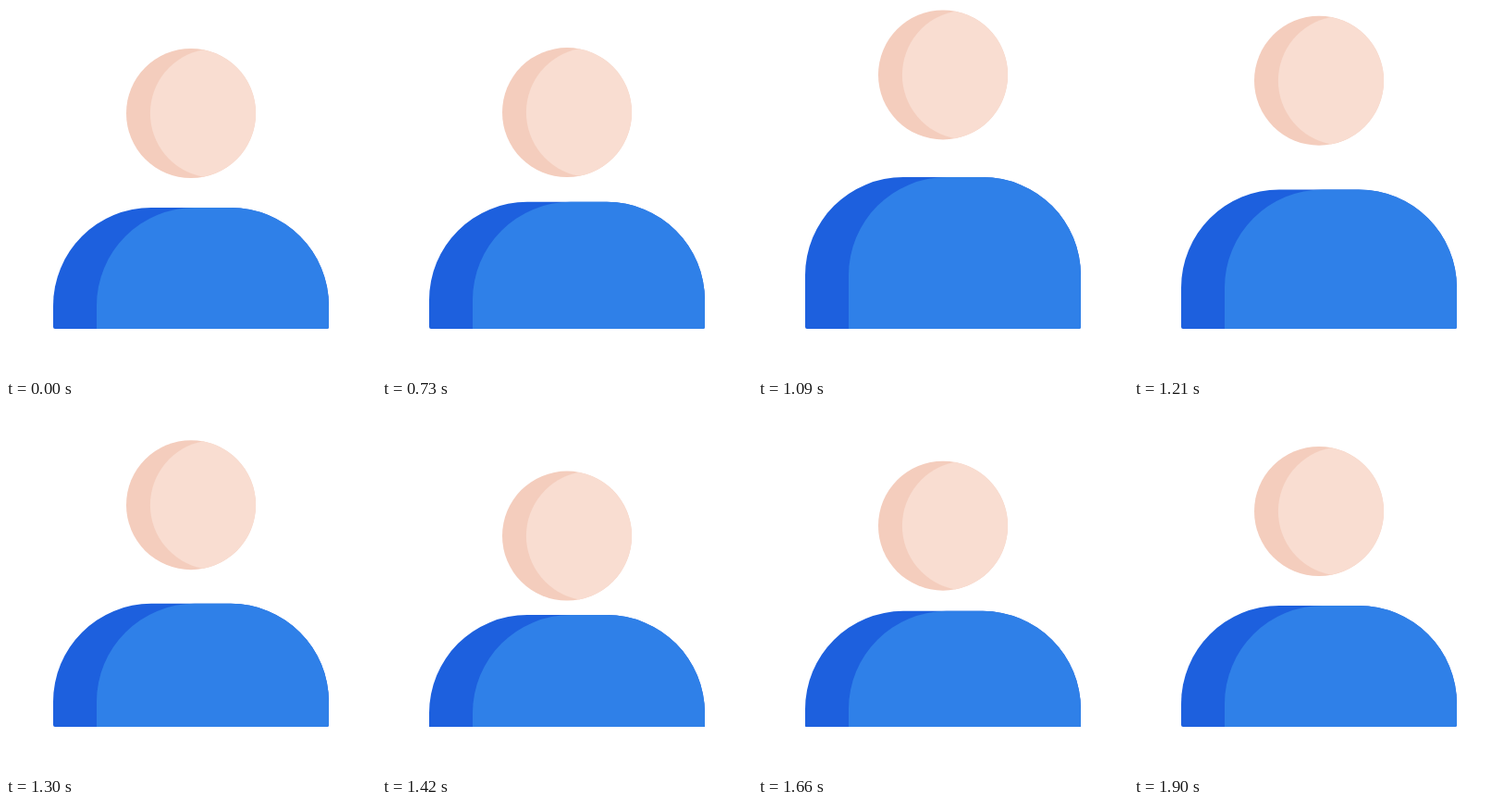
Write an HTML page that moves like this. It is 400 px wide and 400 px high and loops after 1.93 s.

```html
<!DOCTYPE html>
<html lang="en">
<head>
<meta charset="utf-8">
<title>Jumping person icon</title>
<style>
  html, body { margin: 0; width: 100%; height: 100%; overflow: hidden; background: #fff; }
  svg { display: block; width: 100vw; height: 100vh; }
</style>
</head>
<body>
<svg viewBox="0 0 400 400">
  <g id="head">
    <circle cx="200" cy="116" r="70" fill="#f4cdbd"/>
    <path d="M213 47.2 A70 70 0 0 1 213 184.8 A70 70 0 0 1 213 47.2 Z" fill="#f9ddd1" id="face"/>
  </g>
  <path id="bodyShade" fill="#1d60de"/>
  <path id="bodyLight" fill="#2f80e8"/>
</svg>
<script>
const LOOP = 1930, START = 700, STEP = 30;
const LEFT = 51, RIGHT = 349, BOTTOM = 349, TOP = 218, RADIUS = 106, SHADE = 47;
const byId = id => document.getElementById(id);
const mix = (a, b, p) => a + (b - a) * p;

const sineInOut = p => (1 - Math.cos(Math.PI * p)) / 2;
const sineOut = p => Math.sin(Math.PI * p / 2);
const cubicOut = p => 1 - (1 - p) ** 3;

// Cubic bezier easing with handles (x1, 0) and (x2, 1).
const bezier = (x1, x2) => p => {
  let lo = 0, hi = 1;
  for (let i = 0; i < 24; i++) {
    const t = (lo + hi) / 2, u = 1 - t;
    if (3 * u * u * t * x1 + 3 * u * t * t * x2 + t ** 3 < p) lo = t; else hi = t;
  }
  return 3 * (1 - lo) * lo * lo + lo ** 3;
};

// Each key: [step, vertical offset, easing into it]
const headKeys = [[0, 0], [15, -42, bezier(.28, .2)], [25, 28.3, sineInOut], [40, 0, sineInOut]];
const bodyKeys = [[0, 0], [15, -33, cubicOut], [25, 10.6, sineOut], [40, 0, sineInOut]];

function offsetAt(keys, step) {
  for (let i = 1; i < keys.length; i++) {
    const [from, a] = keys[i - 1], [to, b, ease] = keys[i];
    if (step <= to) return mix(a, b, ease((step - from) / (to - from)));
  }
  return 0;
}

// Bust with a fixed base; only the shoulders move.
function bust(left, top, leftCorner, rightCorner) {
  const arc = `A${RADIUS} ${RADIUS} 0 0 1`;
  return `M${left} ${top + RADIUS} ${arc} ${left + RADIUS} ${top} H${RIGHT - RADIUS} ` +
    `${arc} ${RIGHT} ${top + RADIUS} V${BOTTOM - rightCorner} ` +
    `Q${RIGHT} ${BOTTOM} ${RIGHT - rightCorner} ${BOTTOM} H${left + leftCorner} ` +
    `Q${left} ${BOTTOM} ${left} ${BOTTOM - leftCorner} Z`;
}

function draw(time) {
  const step = Math.max(0, Math.floor((time % LOOP - START) / STEP));
  const lift = offsetAt(bodyKeys, step);
  const corner = Math.min(2, Math.max(0, 2 - lift * .2));
  byId("head").setAttribute("transform", `translate(0 ${offsetAt(headKeys, step)})`);
  byId("bodyShade").setAttribute("d", bust(LEFT, TOP + lift, corner, corner));
  byId("bodyLight").setAttribute("d", bust(LEFT + SHADE, TOP + lift, 0, corner));
}

// The lit side of the face: two arcs of equal radius, 26 px apart.
byId("face").setAttribute("d", "M213 47.2 A70 70 0 0 1 213 184.8 A70 70 0 0 1 213 47.2 Z");

const origin = performance.now();
function tick() {
  draw(performance.now() - origin);
  requestAnimationFrame(tick);
}
tick();
</script>
</body>
</html>
```
